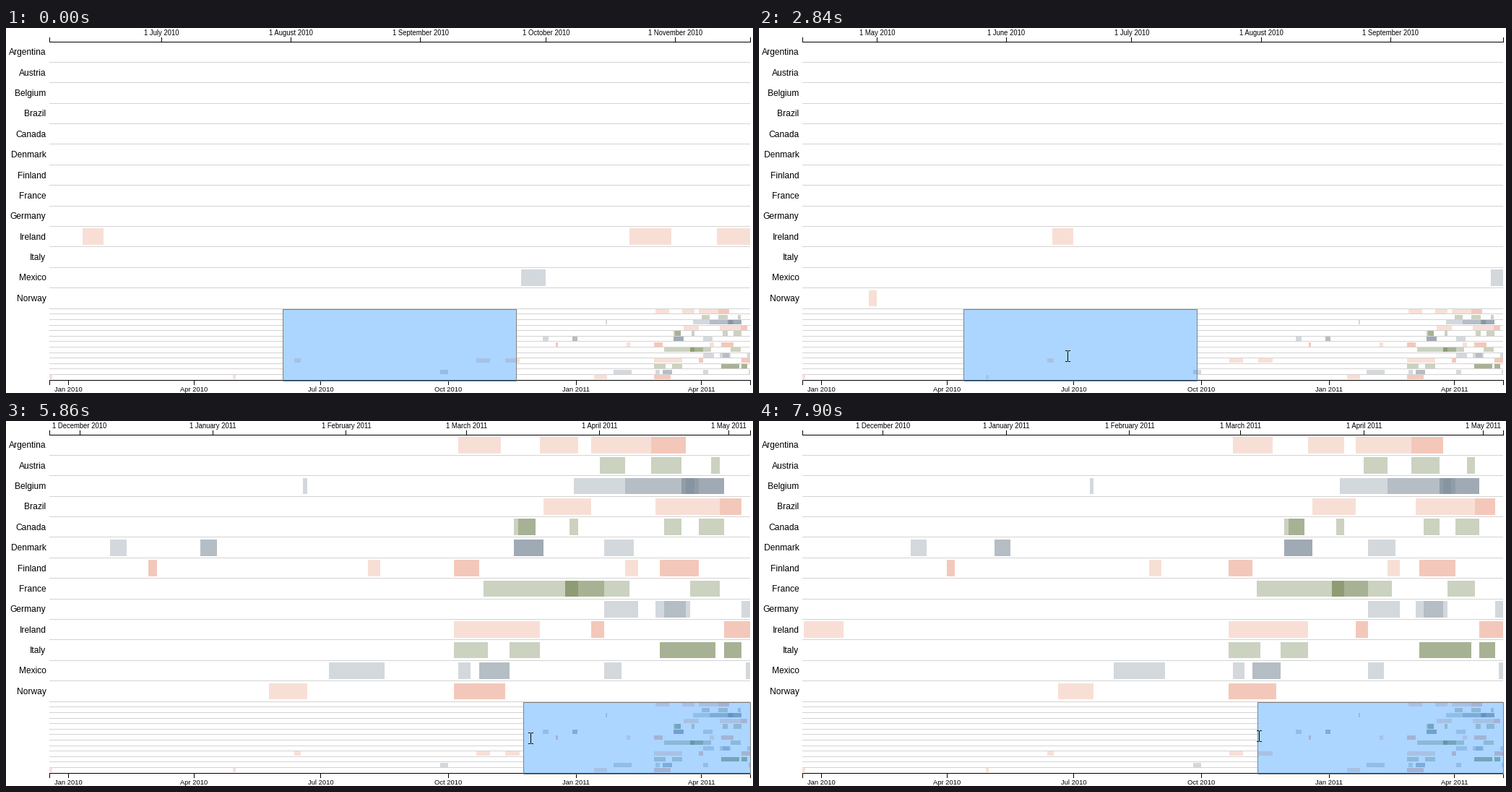
A matplotlib script for the animation above (7.99 s loop, 1034 by 505 pixels).

```python
import numpy as np
import matplotlib.pyplot as plt
from matplotlib.animation import FuncAnimation
from matplotlib.collections import PolyCollection
from matplotlib.colors import to_rgba
from matplotlib.patches import Polygon

W, H, DPI = 1034, 505, 64
LEFT, RIGHT = 60, 1030
TOP, MAIN_ROW = 19, 28.39
MINI_TOP, MINI_ROW = 388.4, 7.58
FIRST, LAST = -14, 490            # days counted from 1 January 2010
DAY = (RIGHT - LEFT) / (LAST - FIRST)
BRUSH_W = 323
INTERVAL, FRAMES = 34, 235

PINK, GREEN, GREY = "darksalmon", "darkolivegreen", "slategray"

# name, colour, (first day, last day, layers)
LANES = [
    ("Argentina", PINK, [(422, 432), (441, 450), (453, 475), (467, 475)]),
    ("Austria", GREEN, [(455, 461), (467, 474), (481, 483)]),
    ("Belgium", GREY, [(386, 387), (449, 478), (461, 484), (474, 484, 2),
                       (475, 477)]),
    ("Brazil", PINK, [(442, 453), (468, 488), (483, 488)]),
    ("Canada", GREEN, [(435, 440), (436, 440), (448, 450), (470, 474),
                       (478, 484)]),
    ("Denmark", GREY, [(341, 345), (362, 366, 2), (435, 442, 3), (456, 463)]),
    ("Finland", PINK, [(350, 352, 2), (401, 404), (421, 427, 2), (461, 464),
                       (469, 478, 2)]),
    ("France", GREEN, [(428, 462), (447, 456), (447, 450), (476, 483)]),
    ("Germany", GREY, [(456, 464), (468, 476), (470, 475), (488, 490)]),
    ("Ireland", PINK, [(162, 167), (293, 303), (314, 324), (421, 441),
                       (453, 456, 2), (484, 490, 2)]),
    ("Italy", GREEN, [(421, 429), (434, 441), (469, 482, 2), (484, 488, 2)]),
    ("Mexico", GREY, [(267, 273), (392, 405), (422, 425), (427, 434, 2),
                      (456, 460), (489, 490)]),
    ("Norway", PINK, [(-14, -12), (118, 120), (378, 387), (421, 433, 2)]),
]

MONTHS = ("January February March April May June July August September "
          "October November December").split()
LENGTHS = [31, 28, 31, 30, 31, 30, 31, 31, 30, 31, 30, 31]
MONTH_DAYS = np.concatenate([[0], np.cumsum(LENGTHS * 2)])[:17]

# Moments at which the picture is refreshed (start, end, count)
STEPS = np.concatenate([[0]] + [np.linspace(*s) for s in (
    (120, 440, 5), (750, 750, 1), (910, 1640, 11), (1730, 2480, 11),
    (2540, 3290, 11), (3380, 4120, 11), (4190, 4780, 9), (4980, 5140, 3),
    (5320, 5460, 3), (5610, 5610, 1), (5770, 6540, 11), (6630, 7400, 11),
    (7470, 7900, 7))])

# Left edge of the brush: time, position, speed
BRUSH_KEYS = [
    (840, 383.5, 0), (1275, 487.5, .43), (1740, 660, 0), (2840, 283.5, -.43),
    (3400, 110, 0), (4558.75, 639.7, .31), (4780, 707, 0), (5693, 707, 0),
    (6540, 864.6, .2), (6930, 920, 0), (7323, 871.6, -.187), (7900, 690.6, 0),
]


def brush_left(t):
    """Cubic Hermite path through the brush keys."""
    if t <= BRUSH_KEYS[0][0]:
        return BRUSH_KEYS[0][1]
    for (t0, p0, v0), (t1, p1, v1) in zip(BRUSH_KEYS, BRUSH_KEYS[1:]):
        if t <= t1:
            d, u = t1 - t0, (t - t0) / (t1 - t0)
            s = u * u * (3 - 2 * u)
            return (p0 + (p1 - p0) * s + v0 * d * u * (1 - u) ** 2
                    + v1 * d * u * u * (u - 1))
    return BRUSH_KEYS[-1][1]


def cursor_state(t):
    """Kind and position of the mouse cursor; it runs ahead of the brush."""
    if t < 120:
        return None, 0, 0
    if t < 750:
        y = np.interp(t, [120, 360, 440], [496, 455, 448])
        x = np.interp(t, [120, 440], [561, 558])
        return ("arrow" if y > 488 else "move"), x, y
    if 4780 <= t < 5770:
        keys = [4780, 4900, 5140, 5250, 5460, 5610]
        x = np.interp(t, keys, [896, 896, 737, 737, 710, 709])
        y = np.interp(t, keys, [436, 436, 440, 440, 439, 439])
        return ("resize" if x < 720 else "move"), x, y
    speed = (brush_left(t + 1) - brush_left(t - 1)) / 2
    if t >= 7900:
        speed = 0
    offset = 175.5 if t < 5000 else 1.4
    y = np.interp(t, [1275, 2840, 4558, 4780, 5770, 6540, 7323, 7900],
                  [448, 454, 433, 436, 440, 431, 437, 436])
    return "beam", brush_left(t) + offset + 75 * speed, y


def boxes(x0, y0, x1, y1):
    """Corner arrays, shape (n, 4, 2), snapped to whole pixels."""
    x0, y0, x1, y1 = np.broadcast_arrays(*map(np.atleast_1d, (x0, y0, x1, y1)))
    xy = np.stack([x0, y0, x1, y0, x1, y1, x0, y1], axis=1)
    return np.floor(xy + .5).reshape(-1, 4, 2)


fig = plt.figure(figsize=(W / DPI, H / DPI), dpi=DPI, facecolor="white")
ax = fig.add_axes([0, 0, 1, 1])
ax.set_xlim(0, W)
ax.set_ylim(H, 0)
ax.axis("off")


def paint(verts, color, z):
    coll = PolyCollection(verts, facecolors=color, edgecolors="none",
                          linewidths=0, antialiaseds=False, zorder=z)
    ax.add_collection(coll, autolim=False)
    return coll


def label(x, y, text, px, ha="center"):
    return ax.text(x, y, text, fontsize=px * 72 / DPI, ha=ha, va="baseline",
                   family="Liberation Sans", color="black", zorder=3)


# Bars
bars = [(row, bar[0], bar[1], to_rgba(color, .3))
        for row, (_, color, spans) in enumerate(LANES)
        for bar in spans
        for _ in range(bar[2] if len(bar) > 2 else 1)]
bar_row = np.array([b[0] for b in bars])
bar_start = np.array([b[1] for b in bars])
bar_end = np.array([b[2] for b in bars])
bar_color = [b[3] for b in bars]


def day_x(day):
    return LEFT + (day - FIRST) * DAY


main_y = TOP + MAIN_ROW * (bar_row + .1)
mini_y = MINI_TOP + MINI_ROW * (bar_row + .1)
main_bars = paint([], bar_color, 2)
paint(boxes(day_x(bar_start), mini_y, day_x(bar_end), mini_y + MINI_ROW * .8),
      bar_color, 2)

# Lane lines and names
rows = np.arange(len(LANES))
line_y = np.floor(np.concatenate([TOP + MAIN_ROW * (rows + 1),
                                  MINI_TOP + MINI_ROW * rows[1:]]))
paint(boxes(LEFT, line_y, RIGHT, line_y + 1), "lightgray", 1)
for i, (name, _, _) in enumerate(LANES):
    label(55.5, round(TOP + MAIN_ROW * (i + .5) + 4), name, 12, "right")

# Fixed parts of both axes
ends = np.array([LEFT, RIGHT])
paint(boxes(LEFT, [TOP, 487], RIGHT + 1, [TOP + 1, 488]), "black", 3)
paint(boxes(ends, 13, ends + 1, TOP), "black", 3)
quarters = np.floor(day_x(MONTH_DAYS[::3]))[:6]
foot = np.concatenate([ends, quarters])
paint(boxes(foot, 487, foot + 1, 494), "black", 3)
for i, x in enumerate(quarters):
    label(x + .5, 503, f"{MONTHS[i * 3 % 12][:3]} {2010 + i // 4}", 9.4)

# Moving parts
top_ticks = paint([], "black", 3)
top_labels = [label(0, 10, "", 9.5) for _ in range(8)]
blank = paint([], "white", 1.5)
brush_fill = paint([], to_rgba("dodgerblue", .37), 4)
brush_edge = paint([], "gray", 5)
beam = paint([], "black", 6)

ARM = [(0, -11), (4, -7), (1, -7), (1, -1)]
SHAPES = {
    "arrow": [(0, 0), (0, 16), (4, 12.5), (6.5, 18), (8.5, 17), (6, 11.5),
              (11, 11.5)],
    "resize": [(-11, 0), (-7, -4), (-7, -1), (7, -1), (7, -4), (11, 0),
               (7, 4), (7, 1), (-7, 1), (-7, 4)],
    "move": [],
}
for cos, sin in ((1, 0), (0, 1), (-1, 0), (0, -1)):
    arm = [(-4, -7)] + ARM
    arm = [(-1, -7), (-4, -7)] + ARM
    SHAPES["move"] += [(x * cos - y * sin, x * sin + y * cos) for x, y in arm]
pointer = Polygon([(0, 0), (1, 0), (0, 1)], facecolor="white",
                  edgecolor="black", linewidth=.9 * 72 / DPI, zorder=6)
ax.add_patch(pointer)


def update(frame):
    now = frame * INTERVAL + 24
    t = STEPS[STEPS <= now][-1]

    b0 = brush_left(t)
    b1 = b0 + BRUSH_W if t < 5700 else RIGHT
    zoom = (RIGHT - LEFT) / (b1 - b0)

    def main_x(day):
        return LEFT + (day_x(day) - b0) * zoom

    x0 = np.clip(main_x(bar_start), LEFT, RIGHT)
    x1 = np.clip(main_x(bar_end), LEFT, RIGHT)
    main_bars.set_verts(boxes(x0, main_y, x1, main_y + MAIN_ROW * .8))

    shown = [(m, x) for m, x in enumerate(main_x(MONTH_DAYS))
             if LEFT <= x <= RIGHT + 1]
    tick = np.floor([x for _, x in shown])
    top_ticks.set_verts(boxes(tick, 13, tick + 1, TOP))
    for text in top_labels:
        text.set_text("")
    for text, (m, x) in zip(top_labels, shown):
        text.set_text(f"1 {MONTHS[m % 12]} {2010 + m // 12}")
        text.set_x(x)

    l, r = np.floor(b0), np.floor(b1)
    blank.set_verts(boxes(l, 389, r, 487))
    brush_fill.set_verts(boxes(l, 389, r, 489))
    brush_edge.set_verts(boxes([l, l, l, r], [389, 488, 389, 389],
                               [r + 1, r + 1, l + 1, r + 1],
                               [390, 489, 489, 489]))

    kind, cx, cy = cursor_state(t)
    cx, cy = round(cx), round(cy)
    is_beam = kind == "beam"
    beam.set_visible(is_beam)
    pointer.set_visible(kind is not None and not is_beam)
    if is_beam:
        xs = np.array([0, -3, 1, -3, 1]) + cx
        ys = np.array([-7, -8, -8, 7, 7]) + cy
        beam.set_verts(boxes(xs, ys, xs + [1, 3, 3, 3, 3],
                             ys + [14, 1, 1, 1, 1]))
    elif kind:
        pointer.set_xy(np.array(SHAPES[kind]) + [cx + .5, cy + .5])
    return ()


anim = FuncAnimation(fig, update, frames=FRAMES, interval=INTERVAL,
                     init_func=lambda: update(0), repeat=True, repeat_delay=0)
plt.show()
```
